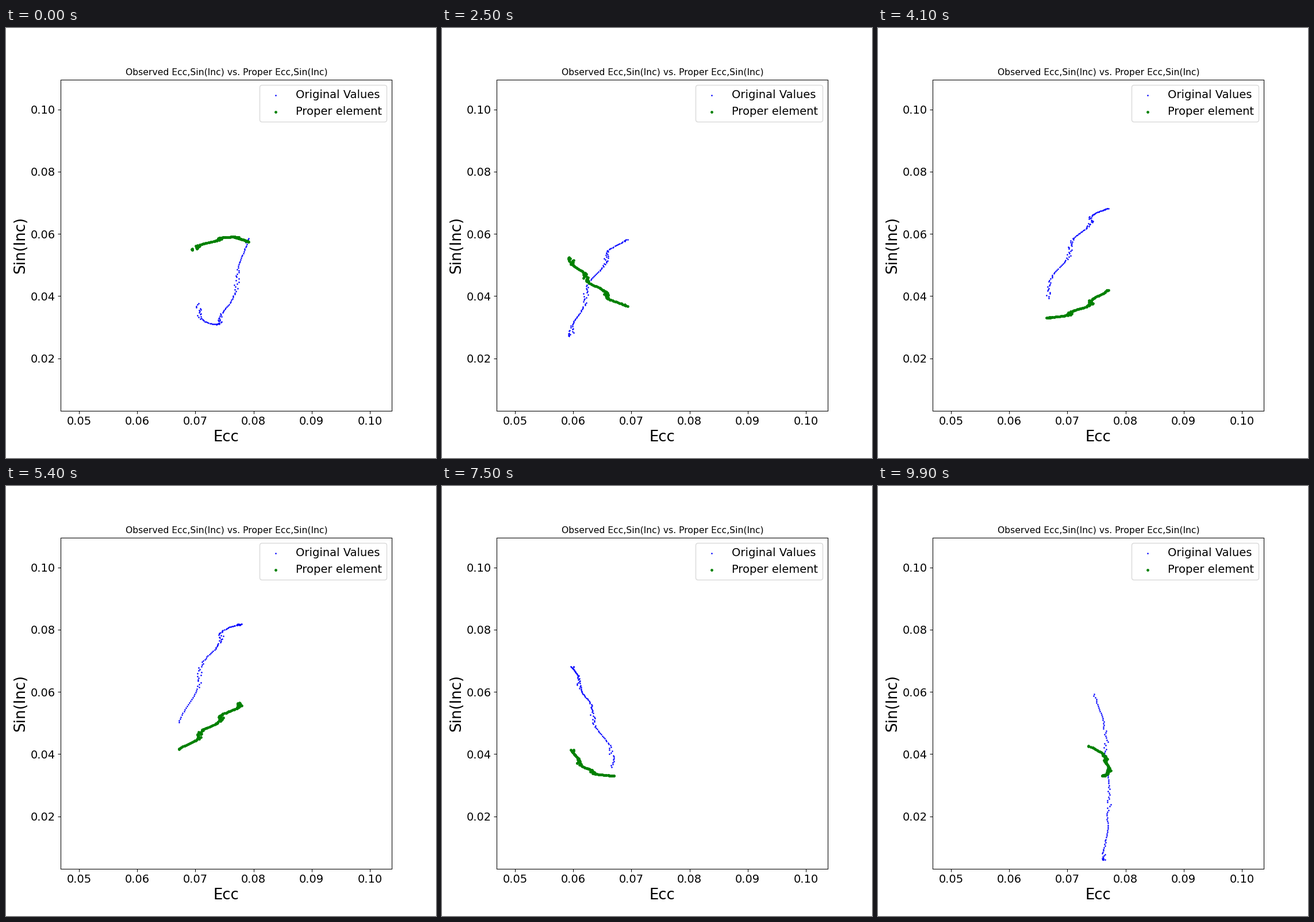
A matplotlib script for the animation above (10000 ms loop, 748x748 px).

```python
import numpy as np
import matplotlib.pyplot as plt
from matplotlib.animation import FuncAnimation

SIZE, FRAMES, POINTS = 748, 100, 100
U = np.linspace(0, 1, POINTS)


def cosd(deg):
    return np.cos(np.radians(deg))


def window(k):
    """Observed and proper (ecc, sin inc) points of one time window."""
    t = k + U
    rng = np.random.default_rng(k)

    # Long-term drift and one passing disturbance, shared by the phases
    slow = cosd(360 * (t - 30) / 110)
    s = (t - 60.5) / 6
    pulse = s * np.exp((1 - s**2) / 2)

    # Three beats per window slow the eccentricity and spread its points
    beat = 1080 * U + 115
    ripple = 3.5 * np.sin(np.radians(beat))
    jitter = 0.00045 * (1 - cosd(beat)) / 2 * rng.uniform(-1, 1, POINTS)

    ecc_phase = 69.75 * t - 94.7 + 24 * pulse + ripple
    inc_phase = 75.16 * t - 43.8 + 26 * slow + 24 * pulse
    forced_phase = 116.79 * t + 143.3 + 12 * slow

    center = 0.06957 + 0.00247 * cosd(360 * (t - 56) / 68)
    ecc = center + 0.00909 * cosd(ecc_phase) + jitter

    # The observed inclination is the proper vector plus a forced one
    proper, forced = 0.046 + 0.013 * cosd(inc_phase), 0.027
    observed = np.sqrt(proper**2 + forced**2
                       + 2 * proper * forced * cosd(forced_phase))

    # The filter drifts at both ends of the record
    edge = np.exp(-12 * t) + np.exp(-12 * (FRAMES - t))
    return (np.column_stack([ecc, observed]),
            np.column_stack([ecc - 0.001 * edge, proper]))


fig = plt.figure(figsize=(8, 8), dpi=SIZE / 8, facecolor="white")
ax = fig.add_axes([0.1275, 0.11, 0.77, 0.77])
ax.set(xlim=(0.04688, 0.10379), ylim=(0.00315, 0.10956),
       xticks=np.arange(0.05, 0.101, 0.01), yticks=np.arange(0.02, 0.101, 0.02))
ax.xaxis.set_major_formatter("{x:.2f}")
ax.yaxis.set_major_formatter("{x:.2f}")
ax.tick_params(labelsize=15)
ax.set_title("Observed Ecc,Sin(Inc) vs. Proper Ecc,Sin(Inc)", fontsize=12)
ax.set_xlabel("Ecc", fontsize=20)
ax.set_ylabel("Sin(Inc)", fontsize=20)

blue = ax.scatter([], [], s=1, c="blue", label="Original Values")
green = ax.scatter([], [], s=7, c="green", label="Proper element")
ax.legend(loc="upper right", fontsize=15)


def update(k):
    observed, proper = window(k)
    blue.set_offsets(observed)
    green.set_offsets(proper)
    return blue, green


anim = FuncAnimation(fig, update, frames=FRAMES, interval=100,
                     repeat=True, repeat_delay=0, blit=False)
plt.show()
```
